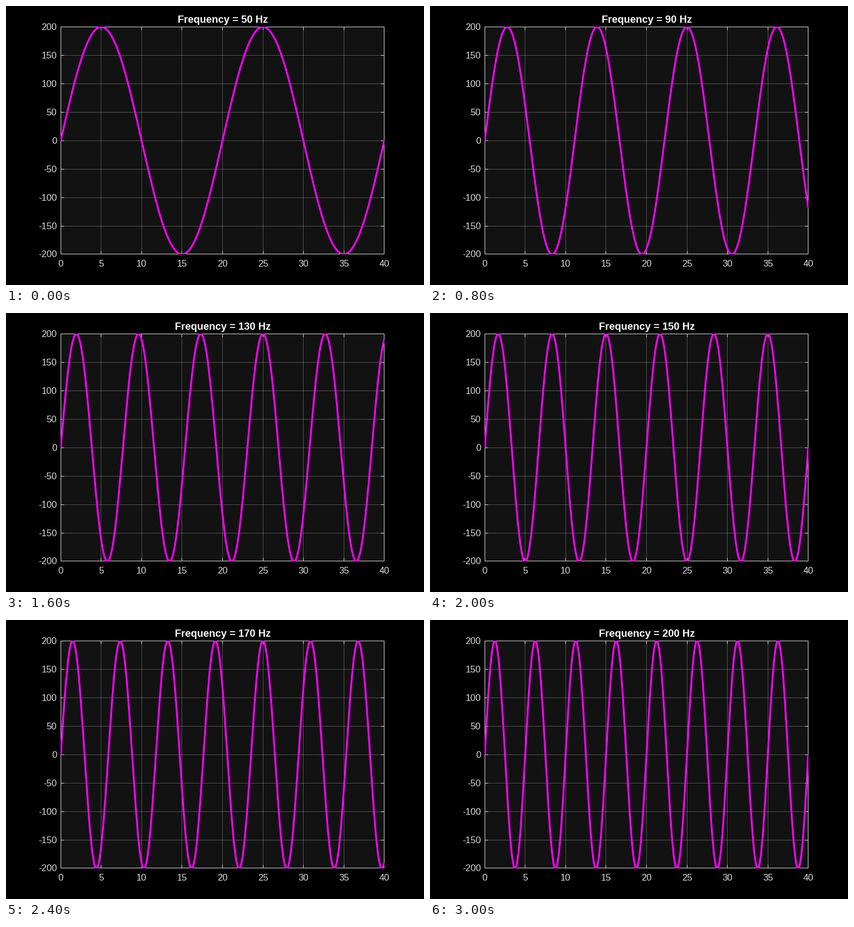
A matplotlib script that plays this animation: 750 px wide and 500 px high, repeating every 3.1 s.

```python
import numpy as np
import matplotlib.pyplot as plt
from matplotlib.animation import FuncAnimation
from matplotlib.patches import Rectangle

W, H, DPI = 750, 500, 100
PT = 72 / DPI  # points per pixel
LEFT, RIGHT, TOP, BOTTOM = 98.25, 678.75, 37.5, 445.0
FRAMES, INTERVAL = 31, 100
TICK = 5.8
INK = "#d9d9d9"

plt.rcParams["font.family"] = "Liberation Sans"


def px(ms):
    return LEFT + (RIGHT - LEFT) * ms / 40


def py(volts):
    return TOP + (BOTTOM - TOP) * (200 - volts) / 400


def pixel(v):
    """Centre of the pixel that holds v."""
    return np.floor(v - 1e-6) + 0.5


fig = plt.figure(figsize=(W / DPI, H / DPI), dpi=DPI, facecolor="black")
ax = fig.add_axes([0, 0, 1, 1])
ax.set_xlim(0, W)
ax.set_ylim(H, 0)
ax.axis("off")

x0, x1, y0, y1 = (pixel(v) for v in (LEFT, RIGHT, TOP, BOTTOM))
ax.add_patch(Rectangle((x0, y0), x1 - x0, y1 - y0, fc="#121212", ec="none"))


def rule(xs, ys, color=INK, alpha=1.0, z=3):
    ax.plot(xs, ys, color=color, alpha=alpha, lw=1.0 * PT, snap=False,
            solid_capstyle="butt", zorder=z)


def label(x, y, text, ha, size=50 / 3, **kw):
    return ax.text(x, y, text, ha=ha, va="baseline", fontsize=size * PT,
                   **{"color": INK, **kw})


for ms in range(0, 41, 5):
    x = pixel(px(ms))
    if 0 < ms < 40:
        rule([x, x], [y0, y1], alpha=0.33, z=2)
        rule([x, x], [y0, y0 + TICK])
        rule([x, x], [y1 - TICK, y1])
    label(px(ms), 467, str(ms), "center")

for volts in range(-200, 201, 50):
    y = pixel(py(volts))
    if abs(volts) < 200:
        rule([x0, x1], [y, y], alpha=0.33, z=2)
        rule([x0, x0 + TICK], [y, y])
        rule([x1 - TICK, x1], [y, y])
    label(91.3, y + 5.5, str(volts), "right")

rule([x0, x1, x1, x0, x0], [y0, y0, y1, y1, y0])

time = np.linspace(0, 40, 1601)
wave, = ax.plot([], [], color="#ff00ff", lw=10 / 3 * PT, zorder=4,
                solid_joinstyle="round", solid_capstyle="butt")
wave.set_clip_path(Rectangle((98, 37), 581, 408, transform=ax.transData))
title = label((LEFT + RIGHT) / 2 + 0.3, 30, "", "center", size=55 / 3,
              color="white", weight="bold")


def update(i):
    freq = 50 + 5 * i
    volts = 200 * np.sin(2 * np.pi * freq * time / 1000)
    wave.set_data(px(time), py(volts))
    title.set_text(f"Frequency = {freq} Hz")
    return wave, title


anim = FuncAnimation(fig, update, frames=FRAMES, interval=INTERVAL,
                     repeat=True, repeat_delay=0)
plt.show()
```
